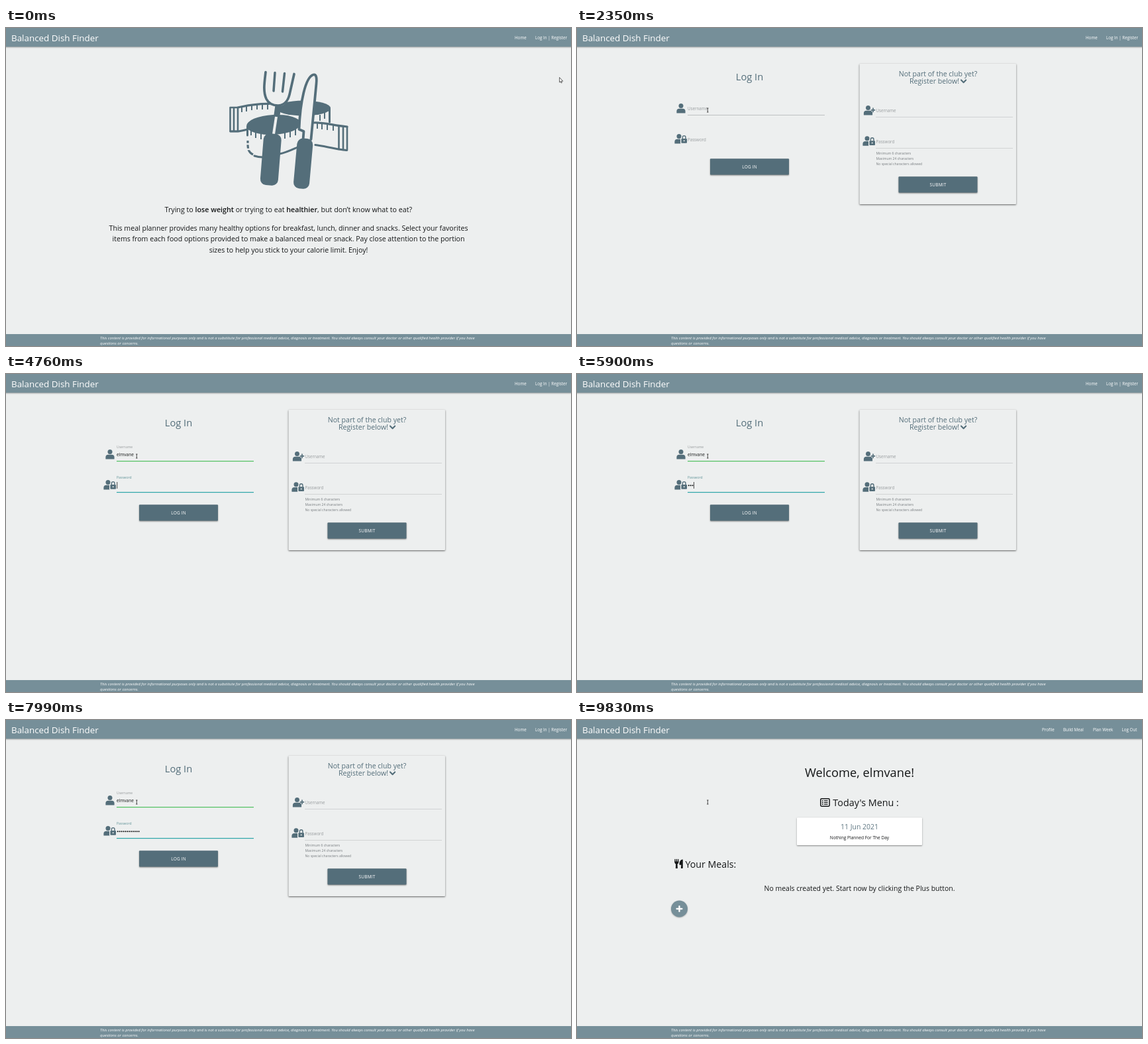
Recreate the animation shown at these times as an HTML page with a canvas. Size 853x480 px, loop 9960 ms.

```html
<!DOCTYPE html>
<html lang="en">
<head>
<meta charset="utf-8">
<title>Balanced Dish Finder</title>
<style>
html, body { margin: 0; width: 100%; height: 100%; overflow: hidden; background: #edefef; }
canvas { display: block; width: 853px; height: 480px; }
</style>
</head>
<body>
<canvas id="stage"></canvas>
<script>
const W = 853, H = 480, LOOP = 9960;
const BG = '#edefef', BAR = '#768f99', SLATE = '#546e7a', INK = '#151718', GREY = '#989c9e';
const TEAL = '#2aa8a0', GREEN = '#4fc060';
const BRAND = 'Balanced Dish Finder', USER = 'elmvane';

const LOGIN_AT = 800, FOCUS_AT = 2500, TAB_AT = 4600, PROFILE_AT = 8800;
const nameKey = i => 3050 + i * 200;
const passKey = i => 5450 + i * 178;
const PASS_LEN = 12;

const canvas = document.getElementById('stage');
const c = canvas.getContext('2d');
const dpr = window.devicePixelRatio || 1;
canvas.width = Math.round(W * dpr);
canvas.height = Math.round(H * dpr);

const clamp = v => Math.max(0, Math.min(1, v));
const mix = (a, b, k) => a + (b - a) * k;
const smooth = k => k * k * (3 - 2 * k);
const easeOut = k => 1 - (1 - k) ** 3;

function text(str, x, y, size, color = INK, align = 'left', style = '400', spacing = 0) {
  c.font = `${style} ${size}px "Open Sans", "Noto Sans", sans-serif`;
  c.letterSpacing = spacing + 'px';
  c.textAlign = align;
  c.fillStyle = color;
  c.fillText(str, x, y);
  c.letterSpacing = '0px';
  return c.measureText(str).width;
}

function rect(x, y, w, h, color) {
  c.fillStyle = color;
  c.fillRect(x, y, w, h);
}

function line(d, width, color = SLATE, cap = 'round') {
  c.lineWidth = width;
  c.strokeStyle = color;
  c.lineCap = cap;
  c.lineJoin = 'round';
  c.stroke(new Path2D(d));
}

function fill(d, color = SLATE) {
  c.fillStyle = color;
  c.fill(new Path2D(d));
}

function oval(x, y, rx, ry, turn = 0, color = SLATE) {
  c.fillStyle = color;
  c.beginPath();
  c.ellipse(x, y, rx, ry, turn, 0, 7);
  c.fill();
}

const disc = (x, y, r, color) => oval(x, y, r, r, 0, color);

function shadowed(draw, blur = 2, dy = 1, alpha = 0.45) {
  c.save();
  c.shadowColor = `rgba(0,0,0,${alpha})`;
  c.shadowBlur = blur * dpr;
  c.shadowOffsetY = dy * dpr;
  draw();
  c.restore();
}

function box(x, y, w, h, color, r = 1) {
  c.fillStyle = color;
  c.beginPath();
  c.roundRect(x, y, w, h, r);
  c.fill();
}

function at(x, y, draw, turn = 0) {
  c.save();
  c.translate(x, y);
  c.rotate(turn);
  draw();
  c.restore();
}

function frameBars(links) {
  rect(0, 0, W, H, BG);
  shadowed(() => rect(-4, -4, W + 8, 32.3, BAR), 2.5, 0.8, 0.45);
  text(BRAND, 8, 20, 13.4, '#fff');
  for (const [label, x] of links) text(label, x, 17, 6.25, '#fff');
  rect(0, 462, W, 18, BAR);
  text('This content is provided for informational purposes only and is not a substitute for professional medical advice, diagnosis or treatment. You should always consult your doctor or other qualified health provider if you have', 142, 469.5, 5.87, '#fff', 'left', 'italic 400');
  text('questions or concerns.', 142, 478, 5.87, '#fff', 'left', 'italic 400');
}

function ticks(list, len) {
  for (const [x, y] of list) line(`M${x} ${y}v${len}`, 2, SLATE, 'butt');
}

function heroArt() {
  // back of the tape
  line('M350 120C365 117 377 114 397 114.5', 3.2);
  line('M339 156H351C357 155 361 154 365 153', 3);
  line('M338.5 120H350V156H338.5ZM344 120V156', 2.6);
  ticks([[356, 119], [363, 118], [371, 116], [379, 115], [387, 115], [395, 115]], 8);
  oval(449, 121, 41, 11.5);
  line('M488.5 122V142', 3);
  ticks([[474, 131], [481, 128]], 9);
  // front reel
  oval(404, 146, 41, 15, -0.05);
  line('M364.5 149V162', 3);
  line('M365 170C365 178 364 187 373 191', 3.2, SLATE, 'butt');
  line('M363 175h5M364 183h6', 2.5, BG, 'butt');
  line('M375 193Q381 195 387 195', 3);
  line('M413 190C423 188 431 184 440 180', 3);
  ticks([[370, 152], [377, 156], [385, 158], [421, 157], [429, 155], [437, 152]], 10);
  // free end
  line('M464 143C480 142 493 147 515 149', 3.2);
  line('M467 176.5C481 178 492 182 514 184.5', 3.2);
  line('M502.5 148V183M509 149V184M515 149V184.5', 2.6);
  ticks([[470, 143], [477, 144], [485, 145], [494, 146]], 9);
  // fork
  fill('M392 67V92C391 111 397 118 411 118C427 118 428 103 435 70Z', BG);
  line('M392 66.5C390 83 388 96 393 107C397 115 403 117 411 117C423 116 427 107 429 96L435 69.5', 3.7);
  line('M406 67.5L404 95M420.5 68.5L417.5 96', 3.5);
  line('M411 117L404.5 163', 9, SLATE, 'butt');
  line('M408 134L404 160', 4, BG, 'butt');
  at(399.8, 198.5, () => box(-13.5, -39, 27, 78, SLATE, 9), 0.08);
  // knife
  const blade = 'M460.5 168L468.5 84C469.5 74 468 69.5 464 70.5C452 74 444 112 442.5 153L449.5 156L448.5 169';
  fill(blade + 'Z', BG);
  line(blade, 3.8);
  at(448.7, 204.7, () => box(-12, -38, 24, 76, SLATE, 9), 0.09);
}

function home() {
  frameBars([['Home', 768], ['Log In | Register', 799]]);
  heroArt();
  const parts = [['Trying to ', 400], ['lose weight', 600], [' or trying to eat ', 400],
    ['healthier', 600], [', but don’t know what to eat?', 400]];
  let x = 239.5;
  for (const [str, weight] of parts) x += text(str, x, 278, 10.7, INK, 'left', weight);
  ['This meal planner provides many healthy options for breakfast, lunch, dinner and snacks. Select your favorites',
    'items from each food options provided to make a balanced meal or snack. Pay close attention to the portion',
    'sizes to help you stick to your calorie limit. Enjoy!'
  ].forEach((row, i) => text(row, 426.5, 305.5 + i * 16.6, 10.58, INK, 'center'));
}

function person(x, y) {
  disc(x, y - 3.4, 3.5);
  fill(`M${x - 6.6} ${y + 7}v-2.2q0-4.1 4.1-4.1h5q4.1 0 4.1 4.1v2.2q0 .5-.6.5h-12q-.6 0-.6-.5Z`);
}

function lockedPerson(x, y) {
  person(x, y);
  box(x + 2, y - 1, 11, 9, BG, 1.5);
  box(x + 3.4, y, 8.6, 6.8, SLATE, 1);
  line(`M${x + 5.4} ${y}v-2q0-2.4 2.3-2.4t2.3 2.4v2`, 1.4);
  disc(x + 7.7, y + 3.3, 1, BG);
}

function label(str, x, y, lift, color) {
  text(str, x, y - 12.3 * lift, mix(6.2, 5, lift), color);
}

function button(str, x, y) {
  shadowed(() => box(x, y, 119, 24.3, SLATE), 2, 1);
  text(str, x + 59.6, y + 15, 6.5, '#fff', 'center', '400', 0.2);
}

function caret(x, y, since) {
  if (since >= 0 && since % 1000 < 500) rect(x, y, 0.8, 10, '#222');
}

function loginForm(t) {
  const focused = t >= FOCUS_AT, tabbed = t >= TAB_AT;
  text('Log In', 260.5, 79, 14.7, SLATE, 'center');

  person(157, 121);
  label('Username', 167, 124.3, easeOut(clamp((t - FOCUS_AT) / 200)), focused && !tabbed ? TEAL : GREY);
  if (focused) rect(167, 131, 207, 1.2, tabbed ? GREEN : TEAL);
  else rect(167, 131.2, 207, 0.6, '#a0a3a5');
  let typed = 0;
  while (typed < USER.length && t >= nameKey(typed)) typed++;
  const end = 167 + text(USER.slice(0, typed), 167, 124.3, 6.5);
  if (focused && !tabbed) caret(end + 0.2, 117, t - (typed ? nameKey(typed - 1) : FOCUS_AT));

  lockedPerson(154, 167);
  label('Password', 167, 170.6, easeOut(clamp((t - TAB_AT) / 200)), tabbed ? '#5f9297' : GREY);
  if (tabbed) {
    rect(167, 178, 207, 1.2, '#2ca5a8');
    let dots = 0;
    while (dots < PASS_LEN && t >= passKey(dots)) {
      disc(168.7 + dots * 2.9, 168.3, 1.05, INK);
      dots++;
    }
    caret(167.4 + dots * 2.9, 163, t - (dots ? passKey(dots - 1) : TAB_AT));
  }
  button('LOG IN', 201, 197.2);
}

function registerCard() {
  shadowed(() => box(426.5, 54, 236.5, 212, BG), 2.5, 1, 0.6);
  text('Not part of the club yet?', 545, 72.7, 10.58, SLATE, 'center');
  text('Register below!', 502, 84.4, 10.58, SLATE);
  line('M580 78.6l3.6 3.6 3.6-3.6', 2.1);

  person(439.5, 124);
  line('M447 121.2v5.2M444.4 123.8h5.2', 1.7);
  text('Username', 451.5, 127.4, 6.2, GREY);
  rect(451, 134.2, 207, 0.5, '#b4b7b9');

  lockedPerson(438, 170.2);
  text('Password', 451.5, 173.6, 6.2, GREY);
  rect(451, 181.2, 207, 0.5, '#b4b7b9');
  ['Minimum 6 characters', 'Maximum 24 characters', 'No special characters allowed']
    .forEach((row, i) => text(row, 451.5, 191 + i * 8, 5.06, '#777c7f'));
  button('SUBMIT', 485.5, 224.3);
}

function login(t) {
  frameBars([['Home', 768], ['Log In | Register', 799]]);
  loginForm(t);
  registerCard();
}

function profile() {
  frameBars([['Profile', 702], ['Build Meal', 734], ['Plan Week', 779], ['Log Out', 822.5]]);
  text(`Welcome, ${USER}!`, 426.5, 86, 18.3, INK, 'center');

  c.strokeStyle = INK;
  c.lineWidth = 1.5;
  c.beginPath();
  c.roundRect(367.8, 118.8, 13.4, 11.4, 1.4);
  c.stroke();
  for (const y of [121.8, 124.5, 127.2]) {
    disc(370.8, y, 0.9, INK);
    line(`M373 ${y}h5.6`, 1.2, INK, 'butt');
  }
  text("Today's Menu :", 386.3, 130, 14.35);

  shadowed(() => box(332, 147.3, 189, 41.8, '#fff'), 2.2, 0.9);
  text('11 Jun 2021', 426.5, 164.7, 10.5, '#5f7782', 'center');
  text('Nothing Planned For The Day', 426.5, 180.3, 6.55, INK, 'center');

  line('M148 210.5v4M150.4 210.5v4M152.8 210.5v4', 1.3, INK);
  fill('M147.4 213.5h6q0 3.5-1.8 4l.3 6.4h-3l.3-6.4q-1.8-.5-1.8-4Z', INK);
  fill('M159.8 210.5v12.6q0 .9-.9.9h-1.2q-.9 0-.8-.9l.4-4.3h-2q-.8 0-.8-.8c0-4.5 2.2-7.8 5.3-7.5Z', INK);
  text('Your Meals:', 163.5, 222.5, 14.2);
  text('No meals created yet. Start now by clicking the Plus button.', 426.5, 257.6, 10.48, INK, 'center');

  shadowed(() => disc(154.5, 285, 12.5, BAR), 2, 0.7, 0.3);
  line('M150.6 285h7.8M154.5 281.1v7.8', 2.3, '#fff');
}

const pointer = [[0, 835.6, 75], [180, 835.6, 75], [620, 820, 13], [860, 820, 13],
  [1270, 309.5, 140], [1400, 300, 138], [1900, 197.3, 124]];

function drawPointer(t) {
  let i = 0;
  while (i < pointer.length - 2 && t >= pointer[i + 1][0]) i++;
  const [t0, x0, y0] = pointer[i], [t1, x1, y1] = pointer[i + 1];
  const k = smooth(clamp((t - t0) / (t1 - t0)));
  const x = mix(x0, x1, k), y = mix(y0, y1, k);
  const overField = t > LOGIN_AT && x > 167 && x < 374 && y > 112 && y < 132;
  at(x, y, () => {
    if (overField) {
      line('M-1.2-3h2.4M0-3v6M-1.2 3h2.4', 0.8, '#222', 'butt');
    } else {
      const arrow = 'M0 0v7l1.6-1.4 1.1 2.4 1-.5-1-2.3h2.1Z';
      fill(arrow, '#fff');
      line(arrow, 0.7, '#222');
    }
  });
}

function draw(t) {
  c.setTransform(dpr, 0, 0, dpr, 0, 0);
  if (t < LOGIN_AT) home();
  else if (t < PROFILE_AT) login(t);
  else profile();
  drawPointer(t);
}

const start = performance.now();
function tick() {
  draw((performance.now() - start) % LOOP);
  requestAnimationFrame(tick);
}
draw(0);
requestAnimationFrame(tick);
</script>
</body>
</html>
```
